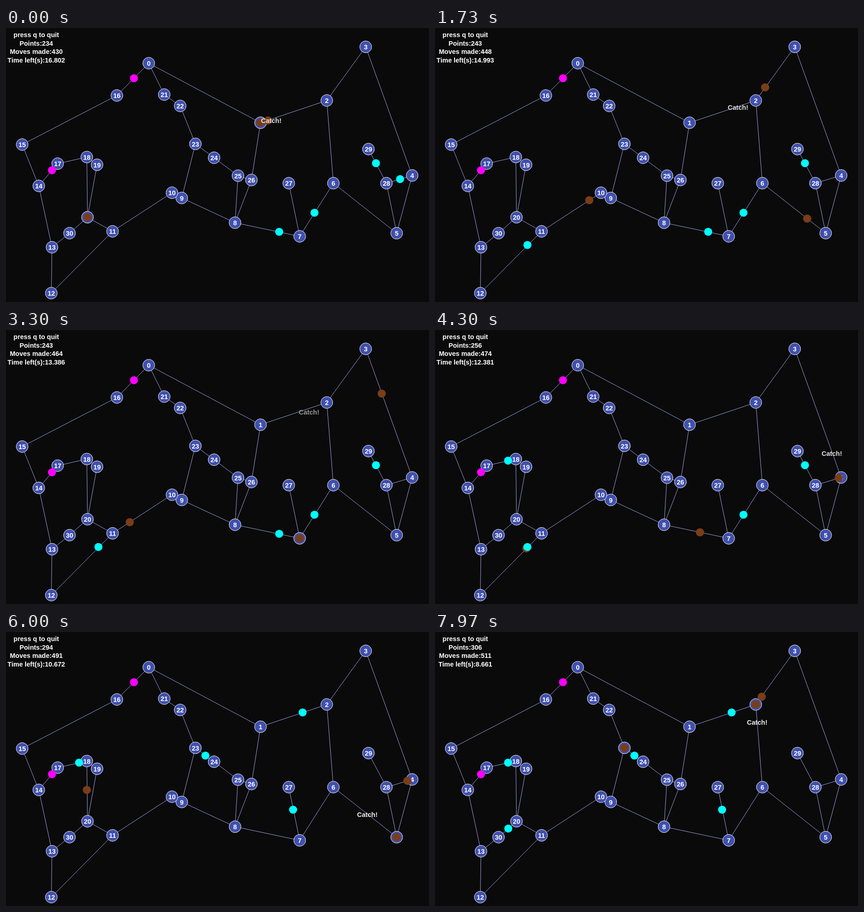
Animation of 929x603 px, one loop 8 s. Source, as an HTML page with a canvas:

```html
<!DOCTYPE html>
<html>
<head>
<meta charset="utf-8">
<style>
html, body { margin: 0; width: 100%; height: 100%; overflow: hidden; background: #0a0a0a; }
canvas { display: block; }
</style>
</head>
<body>
<canvas id="stage" width="929" height="603"></canvas>
<script>
const ctx = document.getElementById('stage').getContext('2d');
const LOOP = 8000;

const nodes = [
  [313, 77], [558.5, 208], [704, 159], [789.5, 41], [891.5, 324], [857.5, 451], [718.5, 341], [644.5, 458],
  [502.5, 428], [385.5, 373.5], [364, 362], [233.5, 447], [99, 583], [100.5, 482], [71.5, 347], [35, 256],
  [243, 148], [113, 298], [177, 283.5], [199.5, 300.5], [178.5, 416], [347, 146], [382, 171], [415.5, 254.5],
  [456.5, 285], [509, 324.5], [538.5, 334], [620.5, 341], [835, 341], [795.5, 266], [139, 451]
];

// Each node joins the next one, apart from the breaks; links are the other edges
const breaks = [16, 20, 26, 27, 29, 30];
const links = [
  [0, 16], [0, 21], [1, 26], [2, 6], [4, 28], [5, 28], [7, 27], [8, 25],
  [8, 26], [9, 23], [11, 20], [13, 30], [14, 17], [18, 20], [20, 30]
];
const edges = nodes.map((_, n) => [n, n + 1]).filter(e => !breaks.includes(e[0])).concat(links);

// Stops: [step, node], [step, x, y], or a bare node that is passed at even speed
const walker = [
  [-6, 582, 201], [0, 1], [11, 665, 172], 2, [25, 769, 68], [27, 786, 46], [31, 3], [36, 848, 205],
  [37, 871, 269], [38, 4], [44, 886, 325], [48, 4], 28, [55, 29], 28, [61, 881, 327], [63, 4],
  [73, 790, 43], [81, 717, 142]
];
const runner = [
  [0, 575, 203], 2, [9, 3], [11, 871, 269], 4, 5, [18, 817, 419], 6, [25, 7], [37, 7], 8, [46, 7], 6,
  [57, 793, 400], [60, 5], [62, 5], 6, [73, 717, 318], [77, 707, 197], [81, 2]
];
const ranger = [
  [0, 20], 11, [11, 292, 408], 10, [25, 9], [28, 9], 10, [36, 11], [43, 11], [44, 200, 480], 12, 11, 20,
  [56, 18], [59, 18], [61, 177, 347], 20, 11, 10, [73, 371, 365], 9, [79, 23], [81, 23]
];

// Targets: x, y, first step, step of removal
const targets = [
  [812, 297, 0, 57], [865, 332, 0, 11], [677, 406, 0, 48], [599.5, 448, 0, 37], [202.5, 477, 11, 50],
  [160, 287, 37], [437.5, 271.5, 48], [651, 176.5, 50], [630, 390.5, 57], [160.5, 432, 77]
];
const fixedTargets = [[280.5, 110], [100.5, 312.5]];

// Catches: step, agent beside the text, points
const catches = [[-6, 0, 234], [11, 0, 243], [37, 0, 256], [48, 1, 268], [50, 2, 281], [57, 1, 294], [77, 1, 306]];
const clock = [[0, 16.802], [11, 15.696], [25, 14.29], [44, 12.381], [61, 10.672], [73, 9.464], [81, 8.661]];

function stepAt(t) {
  if (t < 1900) return Math.floor((t + 70) / 100);
  if (t < 6270) return Math.floor(t / 100) + 1;
  return Math.floor((t - 6270) / 100) + 64;
}

// Gives every stop a step and a place
function route(stops) {
  const path = stops.map(s => s.length === 3 ? s : s.length ? [s[0], ...nodes[s[1]]] : [null, ...nodes[s]]);
  const gap = i => Math.hypot(path[i][1] - path[i - 1][1], path[i][2] - path[i - 1][2]);
  for (let i = 1; i < path.length; i++) {
    if (path[i][0] !== null) continue;
    let end = i, rest = 0;
    while (path[end][0] === null) rest += gap(++end);
    const start = path[i - 1][0];
    path[i][0] = start + (path[end][0] - start) * gap(i) / (gap(i) + rest);
  }
  return path;
}

function along(path, k) {
  const i = Math.max(1, path.findIndex(s => s[0] >= k));
  const [a, b] = [path[i - 1], path[i]];
  const f = (k - a[0]) / (b[0] - a[0]);
  return a.slice(1).map((v, j) => v + (b[j + 1] - v) * f);
}

const paths = [walker, runner, ranger].map(route);

function disc([x, y], r, color) {
  ctx.fillStyle = color;
  ctx.beginPath();
  ctx.arc(x + .5, y + .5, r, 0, 7);
  ctx.fill();
}

function label(text, x, y, color = '#fff') {
  ctx.fillStyle = color;
  ctx.fillText(text, x, y);
}

function draw(k) {
  ctx.fillStyle = '#0a0a0a';
  ctx.fillRect(0, 0, 929, 603);
  ctx.font = 'bold 14.5px "Liberation Sans", Arial, sans-serif';
  ctx.textAlign = 'center';
  ctx.lineWidth = 1;

  ctx.strokeStyle = '#a3a3ee';
  ctx.beginPath();
  for (const [a, b] of edges) {
    ctx.moveTo(nodes[a][0] + .5, nodes[a][1] + .5);
    ctx.lineTo(nodes[b][0] + .5, nodes[b][1] + .5);
  }
  ctx.stroke();

  ctx.strokeStyle = '#fff';
  nodes.forEach((node, n) => {
    disc(node, 13, '#4050ae');
    ctx.stroke();
    label(n, node[0] + .5, node[1] + 6);
  });

  for (const path of paths) disc(along(path, k), 9, '#7a3d17');
  for (const [x, y, from, to = Infinity] of targets)
    if (k >= from && k < to) disc([x, y], 8.8, '#0ff');
  for (const place of fixedTargets) disc(place, 8.8, '#f0f');

  const [born, agent, points] = catches.filter(c => c[0] <= k).pop();
  const [x, y] = along(paths[agent], born);
  const age = k - born, shade = 255 - 4.5 * age;
  label('Catch!', x + .5, y + 6 + Math.round(age / 3), `rgb(${shade},${shade},${shade})`);

  const left = +along(clock, k)[0].toFixed(3);
  ['press q to quit', 'Points:' + points, 'Moves made:' + (430 + k), 'Time left(s):' + left]
    .forEach((text, i) => label(text, 66.5, Math.round(20 + 18.6 * i)));
}

function tick() {
  draw(stepAt(performance.now() % LOOP));
  requestAnimationFrame(tick);
}
tick();
</script>
</body>
</html>
```
